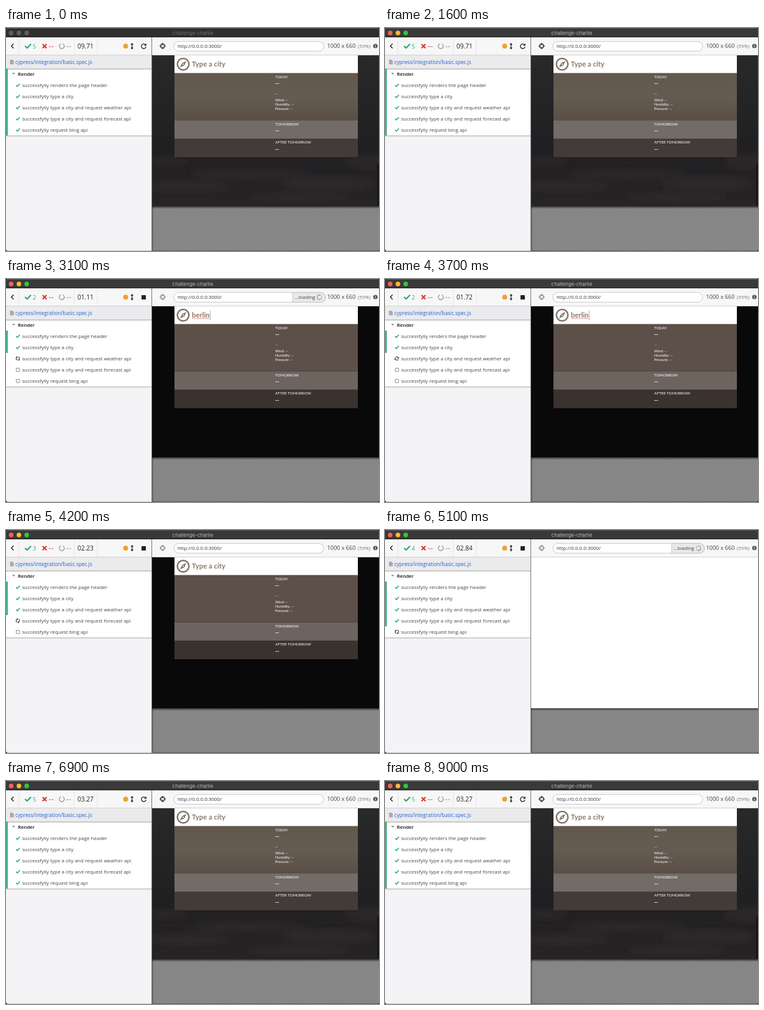
Animation, 600 px wide and 359 px high, one loop 9100 ms. Source, as an HTML page:

```html
<!DOCTYPE html>
<html lang="en">
<head>
<meta charset="utf-8">
<title>Test run</title>
<style>
html, body { margin: 0; width: 100%; height: 100%; overflow: hidden; background: #000; }
svg { display: block; width: 600px; height: 359px; font-family: "Open Sans", "Noto Sans", sans-serif; }
text { white-space: pre; }
.app { font-family: Lato, "Open Sans", sans-serif; fill: #fff; }
.mid { text-anchor: middle; }
.line { fill: none; stroke-linecap: round; stroke-linejoin: round; }
.line.flat { stroke-linecap: butt; }
</style>
</head>
<body>
<svg id="stage" viewBox="0 0 600 359" xmlns="http://www.w3.org/2000/svg"></svg>
<script>
const LOOP = 9100, TICK = 100;
const START = 2000, DONE = 5500, FOCUS = 800;
const GREEN = '#2fa673', RED = '#d8392b';

const tests = [
  'successfylly renders the page header',
  'successfylly type a city',
  'successfylly type a city and request weather api',
  'successfylly type a city and request forecast api',
  'successfylly request bing api'
];
const passTimes = [2600, 3100, 3900, 4700, DONE];

// time, view, loading badge, typed text
const pages = [
  [0, 'photo', 0, ''],
  [START, 'blank', 1, ''],
  [2500, 'plain', 0, ''],
  [2600, 'blank', 1, ''],
  [2800, 'plain', 0, ''],
  [2900, 'plain', 0, 'ber'],
  [3000, 'plain', 0, 'berlin'],
  [3100, 'plain', 1, 'berlin'],
  [3200, 'blank', 1, ''],
  [3500, 'plain', 0, ''],
  [3600, 'plain', 0, 'ber'],
  [3700, 'plain', 0, 'berlin'],
  [3900, 'blank', 1, ''],
  [4200, 'plain', 0, ''],
  [4400, 'plain', 0, 'ber'],
  [4500, 'plain', 0, 'berlin'],
  [4700, 'plain', 1, 'berlin'],
  [4800, 'blank', 1, ''],
  [5300, 'plain', 0, ''],
  [DONE, 'photo', 0, '']
];

// time, seconds on the clock
const clock = [[START, 0], [2200, 0], [2300, .12], [3100, 1.11], [4200, 2.23], [5100, 2.84], [DONE, 3.27], [LOOP, 3.27]];

const rect = (x, y, w, h, fill, more = '') => `<rect x="${x}" y="${y}" width="${w}" height="${h}" fill="${fill}" ${more}/>`;
const circle = (x, y, r, fill, more = '') => `<circle cx="${x}" cy="${y}" r="${r}" fill="${fill}" ${more}/>`;
const text = (x, y, size, fill, str, more = '') => `<text x="${x}" y="${y}" font-size="${size}" fill="${fill}" ${more}>${str}</text>`;
const line = (d, color, width, cap = '') => `<path class="line ${cap}" d="${d}" stroke="${color}" stroke-width="${width}"/>`;
const label = (y, size, str, bold = '') => text(433, y, size, '#fff', str, bold && 'font-weight="700"');
const dashes = (x, color) => line(`M${x} 30H${x + 3.2}M${x + 4.4} 30H${x + 7.6}`, color, .9, 'flat');

const refresh = `${line('M-2.7 -.6A2.8 2.8 0 0 1 2.2 -1.7M2.7 .6A2.8 2.8 0 0 1 -2.2 1.7', '#333', 1.1, 'flat')}
  <path d="M3.2 -3.1V-.5H.6ZM-3.2 3.1V.5H-.6Z" fill="#333"/>`;

const row = (name, i) => {
  const y = 92 + i * 18;
  return `<g id="row${i}">
    ${rect(0, y - 9, 3, 18, '#45b485', 'data-part="bar"')}
    <g data-part="pass">${line(`M16.2 ${y}l2.1 2.1 4 -4.3`, GREEN, 1.5, 'flat')}</g>
    <g data-part="run" transform="translate(19 ${y})"><g data-part="spin">${refresh}</g></g>
    <g data-part="wait">${rect(16.5, y - 2.5, 5.4, 5.4, 'none', 'stroke="#777" stroke-width=".8" rx=".4"')}</g>
    ${text(26, y + 2.6, 7.98, '#444', name)}
  </g>`;
};

const dots = Array.from({ length: 8 }, (_, i) => {
  const a = i * Math.PI / 4;
  return circle((3.6 * Math.cos(a)).toFixed(2), (3.6 * Math.sin(a)).toFixed(2), .8, '#333', `opacity="${.4 + i * .08}"`);
}).join('');

const clouds = [[290, 255, 70, 9], [390, 235, 95, 8], [520, 250, 75, 12], [255, 215, 40, 7], [470, 273, 80, 7], [585, 215, 40, 12]]
  .map(([x, y, rx, ry]) => `<ellipse cx="${x}" cy="${y}" rx="${rx}" ry="${ry}" fill="#3a3432" opacity=".4"/>`).join('');

const fade = (id, dir, alpha) => `<linearGradient id="${id}" x1="0" x2="${dir === 'right' ? 1 : 0}" y2="${dir === 'down' ? 1 : 0}">
  <stop stop-color="#000" stop-opacity="${alpha}"/><stop offset="1" stop-color="#000" stop-opacity="0"/></linearGradient>`;

document.getElementById('stage').innerHTML = `
<defs>
  <pattern id="hatch" width="4" height="4" patternUnits="userSpaceOnUse">
    ${rect(0, 0, 4, 4, '#949294')}
    <path d="M-1 1L1 -1M-1 5L5 -1M3 5L5 3" stroke="#7a797a" stroke-width="1.35"/>
  </pattern>
  ${fade('under', 'down', .6)}${fade('beside', 'right', .3)}${fade('drop', 'down', .24)}
  <linearGradient id="sky" x2="0" y2="1"><stop stop-color="#2a2929"/><stop offset=".6" stop-color="#201f22"/><stop offset="1" stop-color="#272425"/></linearGradient>
  <linearGradient id="today" x2="0" y2="1"><stop stop-color="#62584d"/><stop offset=".5" stop-color="#655b51"/><stop offset="1" stop-color="#594f48"/></linearGradient>
  <filter id="soft" x="-30%" y="-100%" width="160%" height="300%"><feGaussianBlur stdDeviation="5"/></filter>
  <clipPath id="view">${rect(235, 44, 365, 243, '#000')}</clipPath>
  <clipPath id="frame">${rect(0, 0, 600, 359, '#000', 'rx="4"')}</clipPath>
</defs>
<g clip-path="url(#frame)">
${rect(0, 0, 600, 359, '#f4f3f5')}

${rect(0, 0, 600, 15, '#3a393a', 'id="bar"')}
${rect(0, 0, 600, .7, '#666566')}
${rect(0, 14.2, 600, .8, '#1d1c1d')}
${circle(8.3, 8, 3.7, '#f95f57', 'id="l0"')}${circle(20.8, 8, 3.7, '#f8bc2e', 'id="l1"')}${circle(33.3, 8, 3.7, '#2dc840', 'id="l2"')}
${text(300.5, 10.9, 8, '#b9b8b9', 'challenge-charlie', 'id="title" class="mid" font-family="Inter, Roboto, sans-serif"')}

${rect(0, 15, 600, 28.5, '#f8f7f8')}
${rect(0, 43, 600, .8, '#c9c8ca')}
${[20.5, 109.5, 146.5].map(x => rect(x, 15, .7, 28, '#dcdbdd')).join('')}
${line('M11.8 25.8L8.6 29L11.8 32.2', '#222', 1.4)}
${line('M30.6 29L34 32.2L40.2 25.8', GREEN, 2.1, 'flat')}
${text(43, 32.6, 9.4, GREEN, '5', 'id="passed"')}
<g id="none">${dashes(43, GREEN)}</g>
${line('M58.8 26L65.2 32.4M65.2 26L58.8 32.4', RED, 2.1, 'flat')}
${dashes(69, RED)}
${circle(89.8, 29.2, 4, 'none', 'stroke="#888" stroke-width="1.2" stroke-dasharray="21.5 3.6" transform="rotate(-68 89.8 29.2)"')}
${dashes(97, '#888')}
${text(115, 32.6, 10.1, '#222', '', 'id="clock"')}
${circle(192.5, 29.2, 3.9, '#f0a030')}
${line('M202.8 26V32.5', '#222', 1.2)}<path d="M202.8 24L205.2 27H200.4ZM202.8 34.5L205.2 31.5H200.4Z" fill="#222"/>
<g id="again">${line('M224.3 27A3.7 3.7 0 1 0 225 30.6', '#222', 1.3)}<path d="M225.8 24.8V28.6H222Z" fill="#222"/></g>
${rect(218, 26, 7, 7, '#222', 'id="stop" rx=".5"')}

${rect(0, 65.5, 234, 108, '#fff')}
${rect(0, 44, 234, 21.5, '#ebebed')}
${rect(0, 65, 234, 3.5, 'url(#drop)')}
<path d="M6.5 51H10.3L12.5 53.2V58.5H6.5Z" fill="#a9a9ab"/>
${text(15, 57.6, 8.2, '#1f63d0', 'cypress/integration/basic.spec.js')}
${rect(0, 173, 234, 1, '#bdbcbe')}${rect(0, 174, 234, 1.2, '#e2e1e3')}
${rect(0, 65.5, 3, 18, '#45b485', 'id="suite"')}
<path d="M9.8 72.2H14.8L12.3 75Z" fill="#888"/>
${text(19, 76.8, 7.8, '#111', 'Render', 'font-weight="600"')}
${tests.map(row).join('')}

<g id="target">
  ${circle(252, 29, 3.3, 'none', 'stroke="currentColor" stroke-width="1.2"')}
  ${line('M252 24.3V27.2M252 30.8V33.7M247.3 29H250.2M253.8 29H256.7', 'currentColor', 1.2)}
</g>
${rect(270, 21.7, 241, 15.6, '#fff', 'id="address" rx="7.8" stroke="#bcbbbd" stroke-width=".8"')}
${text(276, 31.9, 7.95, '#333', 'http://0.0.0.0:3000/')}
<g id="loading">
  <path d="M461 21.7H506A7.8 7.8 0 0 1 506 37.3H461Z" fill="#e9e8ea" stroke="#bcbbbd" stroke-width=".8"/>
  ${text(464, 31.9, 7.9, '#444', '...loading')}
  <g transform="translate(504.3 29.3)"><g id="wheel">${dots}</g></g>
</g>
${text(516.5, 32.2, 9.1, '#444', '1000 x 660')}
${text(566, 31.9, 7.8, '#777', '(59%)')}
${circle(594.2, 29, 3.6, '#555')}${rect(593.7, 28.4, 1, 2.8, '#fff')}${rect(593.7, 26.6, 1, 1, '#fff')}

${rect(235, 286, 365, 73, 'url(#hatch)')}
${rect(235, 287, 365, 4, 'url(#under)')}
${rect(235, 287, 3, 72, 'url(#beside)')}
<g clip-path="url(#view)">
  ${rect(235, 44, 365, 243, '#0a090a', 'id="back"')}
  <g id="photo">
    ${rect(235, 44, 365, 243, 'url(#sky)')}
    <g filter="url(#soft)">${clouds}</g>
    ${rect(597, 218, 3, 68, '#171516')}
  </g>
  <g id="app" class="app">
    ${rect(271, 44, 295, 29, '#fff')}
    ${rect(271, 72.5, 295, 76, '#5c5048', 'id="s0"')}
    ${rect(271, 148.5, 295, 30, '#6e645f', 'id="s1"')}
    ${rect(271, 178.5, 295, 29.5, '#3a322e', 'id="s2"')}
    ${circle(285, 58.3, 9.3, 'none', 'stroke="#85786d" stroke-width="2.5"')}
    <path d="M290.2 53.1L286.9 60.2L279.8 63.5L283.1 56.4Z" fill="#85786d"/>
    ${circle(285, 58.3, 1.1, '#fff')}
    ${text(299, 62, 11.3, '#8a7a6c', '', 'id="city" font-weight="700"')}
    <g id="typed">
      ${line('M299.5 64' + 'l1 -.8l1 .8'.repeat(14), '#e0463c', .7)}
      ${rect(328.5, 50.5, .6, 15.5, '#777')}
    </g>
    ${label(80.6, 6.15, 'TODAY')}
    ${label(91.8, 8.5, '--', 1)}
    ${label(108, 6.4, '--')}
    ${label(118, 5.7, 'Wind: --')}
    ${label(124.9, 5.7, 'Humidity: --')}
    ${label(131.8, 5.7, 'Pressure: --')}
    ${label(156.5, 6.15, 'TOMORROW')}
    ${label(167.8, 8.5, '--', 1)}
    ${label(186.4, 6.15, 'AFTER TOMORROW')}
    ${label(197.6, 8.5, '--', 1)}
  </g>
</g>
${rect(234, 15, 1, 344, '#777678')}
${rect(0, 358.3, 234, .7, '#b5b4b6')}
${rect(235, 358, 365, 1, '#5c5b5c')}
</g>`;

const $ = id => document.getElementById(id);
const show = (el, on) => el.setAttribute('display', on ? 'inline' : 'none');
const paint = (id, color) => $(id).setAttribute('fill', color);
const turn = (el, deg) => el.setAttribute('transform', `rotate(${deg % 360})`);

const rows = tests.map((_, i) => Object.fromEntries(
  [...$('row' + i).querySelectorAll('[data-part]')].map(el => [el.dataset.part, el])));

function seconds(t) {
  if (t < START) return 9.71;
  const i = clock.findIndex(([at]) => at > t);
  const [t0, v0] = clock[i - 1], [t1, v1] = clock[i];
  return v0 + (v1 - v0) * (t - t0) / (t1 - t0);
}

function drawWindow(t) {
  const active = t >= FOCUS;
  paint('bar', active ? '#3a393a' : '#302f30');
  paint('title', active ? '#b9b8b9' : '#706f70');
  ['#f95f57', '#f8bc2e', '#2dc840'].forEach((c, i) => paint('l' + i, active ? c : '#5e5d5e'));
}

function drawReport(t, running) {
  const count = t < START ? tests.length : passTimes.filter(at => at <= t).length;
  rows.forEach((parts, i) => {
    show(parts.bar, i < count);
    show(parts.pass, i < count);
    show(parts.run, i === count);
    show(parts.wait, i > count);
    turn(parts.spin, t * .18 + 70);
  });
  show($('suite'), !running);
  show($('stop'), running);
  show($('again'), !running);
  show($('none'), !count);
  $('passed').textContent = count || '';
  $('clock').textContent = seconds(t).toFixed(2).padStart(5, '0');
  $('target').setAttribute('color', running ? '#888' : '#222');
}

function drawPage(t) {
  const [, view, loading, typed] = pages.findLast(([at]) => at <= t);
  const photo = view === 'photo';
  paint('back', view === 'blank' ? '#fff' : '#0a090a');
  show($('photo'), photo);
  show($('app'), view !== 'blank');
  show($('loading'), loading);
  $('address').setAttribute('width', loading ? 244 : 241);
  turn($('wheel'), t * .45);
  $('city').textContent = typed || 'Type a city';
  show($('typed'), typed === 'berlin');
  const fills = photo ? ['url(#today)', '#736b66', '#423b37'] : ['#5c5048', '#6e645f', '#3a322e'];
  fills.forEach((c, i) => paint('s' + i, c));
}

const origin = performance.now();
let last = -1;
function frame() {
  const t = Math.floor((performance.now() - origin) % LOOP / TICK) * TICK;
  if (t !== last) {
    drawWindow(t);
    drawReport(t, t >= START && t < DONE);
    drawPage(t);
    last = t;
  }
  requestAnimationFrame(frame);
}
frame();
</script>
</body>
</html>
```
